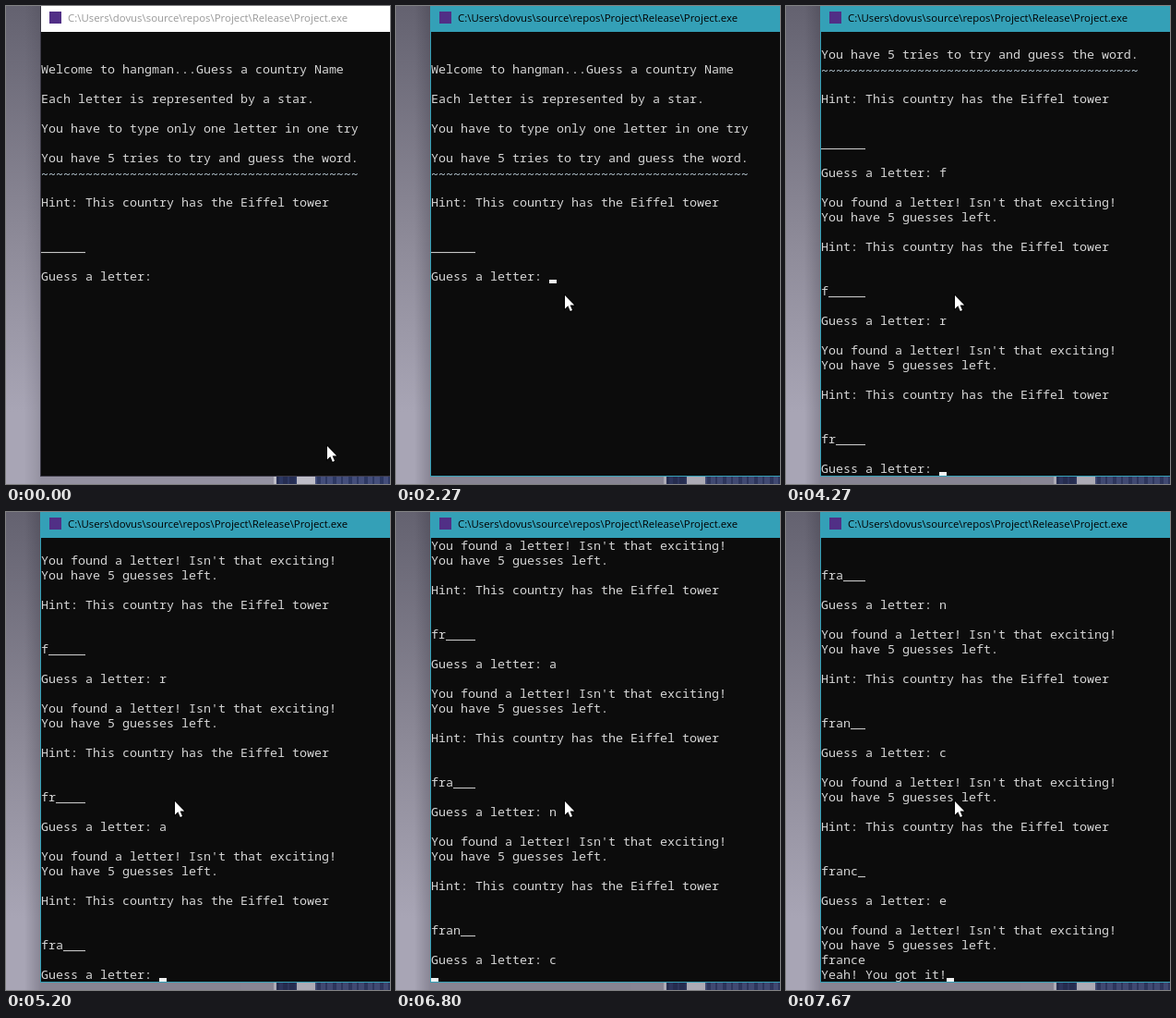
Recreate the animation shown at these times as an HTML page. Size 416 by 517 pixels, loop 8000 ms.

```html
<!DOCTYPE html>
<html lang="en">
<head>
<meta charset="utf-8">
<title>Hangman console</title>
<style>
  html, body { margin: 0; width: 100%; height: 100%; overflow: hidden; background: #8b8898; }
  svg { display: block; width: 416px; height: 517px; }
  .row { font: 13.333px "Noto Sans Mono", "DejaVu Sans Mono", monospace; fill: #d6d6d6; white-space: pre; }
  .wavy { fill: #cfe2ee; transform: translateY(1.5px); }
  #title { font: 11.4px "Open Sans", "Noto Sans", sans-serif; }
</style>
</head>
<body>
<svg viewBox="0 0 416 517">
  <defs>
    <linearGradient id="wall" x2="0" y2="1">
      <stop offset="0" stop-color="#646270"/>
      <stop offset=".5" stop-color="#8e8b99"/>
      <stop offset=".85" stop-color="#a8a5b5"/>
      <stop offset="1" stop-color="#a8a5b5"/>
    </linearGradient>
    <linearGradient id="shade">
      <stop offset="0" stop-color="#22202c" stop-opacity="0"/>
      <stop offset="1" stop-color="#22202c"/>
    </linearGradient>
  </defs>
  <rect width="416" height="517" fill="url(#wall)"/>
  <g id="desk">
    <rect x="290" y="508" width="126" height="9" fill="#d9d7e2"/>
    <rect x="293" y="508" width="22" height="9" fill="#26305a"/>
    <rect x="335" y="508" width="81" height="9" fill="#4a5688"/>
    <path d="M296 513h19M337 513h79" stroke="#303c6c" stroke-width="8" stroke-dasharray="4 5 2 6"/>
  </g>
  <g id="shadow">
    <rect x="20" width="18" height="517" fill="url(#shade)"/>
    <rect x="38" y="508" width="378" height="9" fill="#22202c"/>
  </g>
  <rect id="frame" x="37" width="379" height="509"/>
  <rect id="bar" x="38" width="378" height="28"/>
  <rect x="38" y="28" width="378" height="480" fill="#0c0c0c"/>
  <rect x="47" y="6" width="13" height="13" fill="#512f86"/>
  <text id="title" x="67" y="17">C:\Users\dovus\source\repos\Project\Release\Project.exe</text>
  <g id="rows"></g>
  <rect id="caret" width="8" height="4" fill="#f2f2f2"/>
  <path id="mouse" d="M0 0V14.5L3.3 11.3L5.8 17L8 16.1L5.6 10.5H10.2Z" fill="#fff"
        stroke="#000" stroke-width="1.6" paint-order="stroke"/>
</svg>
<script>
const LOOP = 8000, ROWS = 30, CELL_W = 8, CELL_H = 16, LEFT = 38, TOP = 28;
const $ = id => document.getElementById(id);

// The whole console transcript, one entry per line.
const WORD = "france", PROMPT = "Guess a letter: ", WIN = "Yeah! You got it!";
const lines = ["", "", "Welcome to hangman...Guess a country Name", "",
  "Each letter is represented by a star.", "",
  "You have to type only one letter in one try", "",
  "You have 5 tries to try and guess the word.", "~".repeat(43), ""];
[...WORD].forEach((letter, i) => lines.push(
  "Hint: This country has the Eiffel tower", "", "",
  WORD.slice(0, i).padEnd(WORD.length, "_"), "", PROMPT + letter, "",
  "You found a letter! Isn't that exciting!", "You have 5 guesses left.", ""));
lines.splice(-1, 1, WORD, WIN);

const promptLine = guess => 16 + 10 * guess;

// Key presses alternate: a letter, then Enter.
const keyTimes = [2930, 3090, 3850, 4230, 4870, 5160, 5670, 5890, 6400, 6800, 7270, 7630];
const ECHO = 40;              // Enter's newline shows this long before the reply
const FOCUS_AT = 530, BLINK_FROM = 1200, BLINK = 532;

// Where the text ends: last line and the characters on it.
function textEnd(t, pressed) {
  const guess = pressed >> 1;
  if (pressed % 2) return [promptLine(guess), PROMPT.length + 1];
  if (pressed && t < keyTimes[pressed - 1] + ECHO) return [promptLine(guess - 1) + 1, 0];
  return guess < WORD.length ? [promptLine(guess), PROMPT.length] : [lines.length - 1, WIN.length];
}

// Keys light the caret until the next tick; Enter keeps it lit for one tick more.
function caretLit(t, pressed) {
  const tick = time => Math.floor((time - BLINK_FROM) / BLINK);
  const ticksSince = n => tick(t) - (n ? tick(keyTimes[n - 1]) : -1);
  const sinceEnter = ticksSince(pressed - pressed % 2);
  return t >= BLINK_FROM && (ticksSince(pressed) === 0 || sinceEnter % 2 === 1);
}

const home = { x: 349, y: 477 };
const glides = [
  { from: 0, to: 200, x: 157, y: 370 },
  { from: 480, to: 670, x: 176, y: 321 },
  { from: 840, to: 1000, x: 183, y: 313 }
];

function mouseAt(t) {
  return glides.reduce((at, { from, to, x, y }) => {
    const p = Math.min(1, Math.max(0, (t - from) / (to - from)));
    return { x: at.x + (x - at.x) * p, y: at.y + (y - at.y) * p };
  }, home);
}

function setAttrs(node, attrs) {
  for (const name in attrs) node.setAttribute(name, attrs[name]);
  return node;
}

const rows = Array.from({ length: ROWS }, (_, i) => {
  const row = document.createElementNS("http://www.w3.org/2000/svg", "text");
  setAttrs(row, { class: "row", x: LEFT, y: TOP + i * CELL_H + 13 });
  return $("rows").appendChild(row);
});

function setFocus(active) {
  setAttrs($("bar"), { fill: active ? "#34a0b7" : "#fff" });
  setAttrs($("frame"), { fill: active ? "#34a0b7" : "#3a3844" });
  setAttrs($("title"), { fill: active ? "#000" : "#999" });
  setAttrs($("shadow"), { opacity: active ? .24 : .14 });
}

function render(t) {
  const pressed = keyTimes.filter(time => time <= t).length;
  const [last, chars] = textEnd(t, pressed);
  const scroll = Math.max(0, last - ROWS + 1);
  rows.forEach((row, i) => {
    const n = i + scroll;
    const text = n < last ? lines[n] : n === last ? lines[n].slice(0, chars) : "";
    if (row.textContent !== text) row.textContent = text;
    row.classList.toggle("wavy", text.startsWith("~"));
  });
  setAttrs($("caret"), {
    x: LEFT + chars * CELL_W,
    y: TOP + (last - scroll) * CELL_H + 12,
    visibility: caretLit(t, pressed) ? "visible" : "hidden"
  });
  const { x, y } = mouseAt(t);
  setAttrs($("mouse"), { transform: `translate(${Math.round(x)} ${Math.round(y)})` });
  setFocus(t >= FOCUS_AT);
}

const start = performance.now();
function tick() {
  render((performance.now() - start) % LOOP);
  requestAnimationFrame(tick);
}
tick();
</script>
</body>
</html>
```
